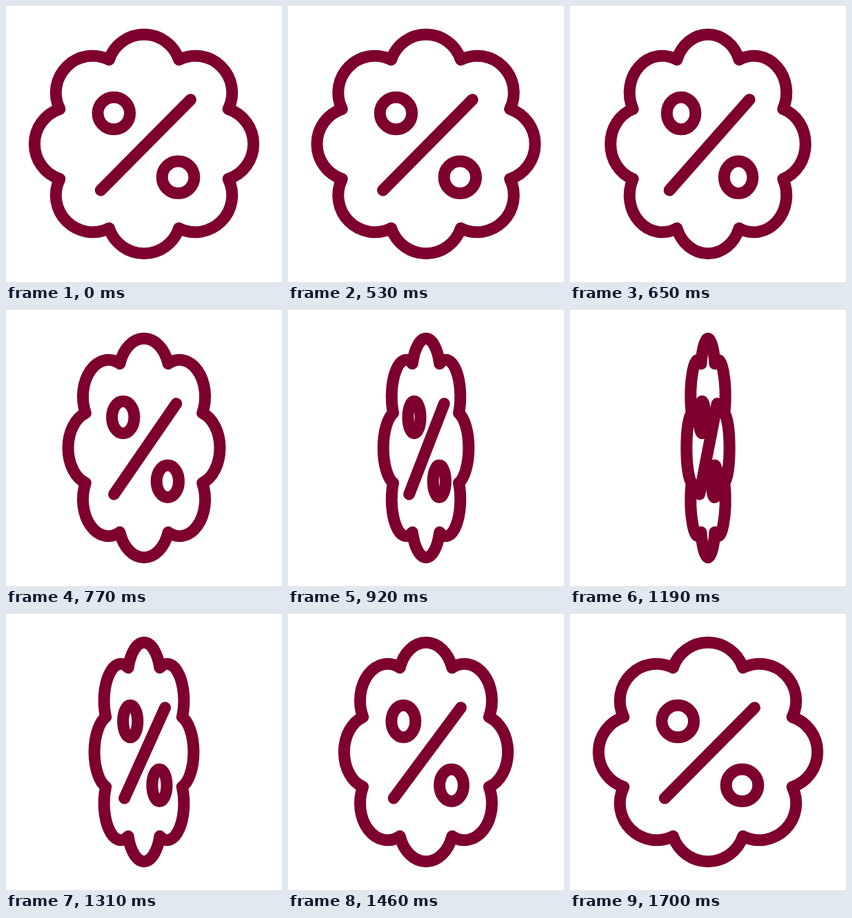
These frames come from a looping animation (400 by 400 pixels, 1730 ms). An HTML page without scripts:

```html
<!DOCTYPE html>
<html lang="en">
<head>
<meta charset="utf-8">
<title>Discount badge</title>
<style>
  @property --turn {
    syntax: "<number>";
    inherits: true;
    initial-value: 1;
  }

  html, body {
    margin: 0;
    width: 100%;
    height: 100%;
    overflow: hidden;
    background: #fff;
  }

  svg {
    display: block;
    width: 100%;
    height: 100%;
  }

  /* --turn runs from 1 to -1; the width is an eased curve of it, never quite zero */
  .badge {
    --sq: calc(var(--turn) * var(--turn));
    --width: calc(var(--turn) * (1.31 - 0.1 * var(--sq) - 0.21 * var(--sq) * var(--sq)));
    transform: scaleX(max(0.004, var(--width), -1 * var(--width)));
    transform-origin: 0 0;
    animation: flip 1730ms infinite;
    fill: none;
    stroke: #7d002e;
    stroke-width: 17;
    stroke-linecap: round;
    stroke-linejoin: round;
  }

  .badge * {
    vector-effect: non-scaling-stroke;
  }

  /* rest for 500 ms, then 40 steps of 30 ms */
  @keyframes flip {
    0% { --turn: 1; animation-timing-function: step-end; }
    28.9016% { --turn: 1; animation-timing-function: steps(40, end); }
    98.2658%, 100% { --turn: -1; }
  }
</style>
</head>
<body>
<svg viewBox="0 0 400 400">
  <g transform="translate(200 200)">
    <g class="badge">
      <path d="M-50.6 -122.1
        A53.3 53.3 0 0 1 50.6 -122.1
        A53.3 53.3 0 0 1 122.1 -50.6
        A53.3 53.3 0 0 1 122.1 50.6
        A53.3 53.3 0 0 1 50.6 122.1
        A53.3 53.3 0 0 1 -50.6 122.1
        A53.3 53.3 0 0 1 -122.1 50.6
        A53.3 53.3 0 0 1 -122.1 -50.6
        A53.3 53.3 0 0 1 -50.6 -122.1Z"/>
      <path d="M-62.7 67L67.5 -64.3"/>
      <circle cx="-43.7" cy="-44.5" r="23.3"/>
      <circle cx="49.5" cy="48.3" r="23.3"/>
    </g>
  </g>
</svg>
</body>
</html>
```
